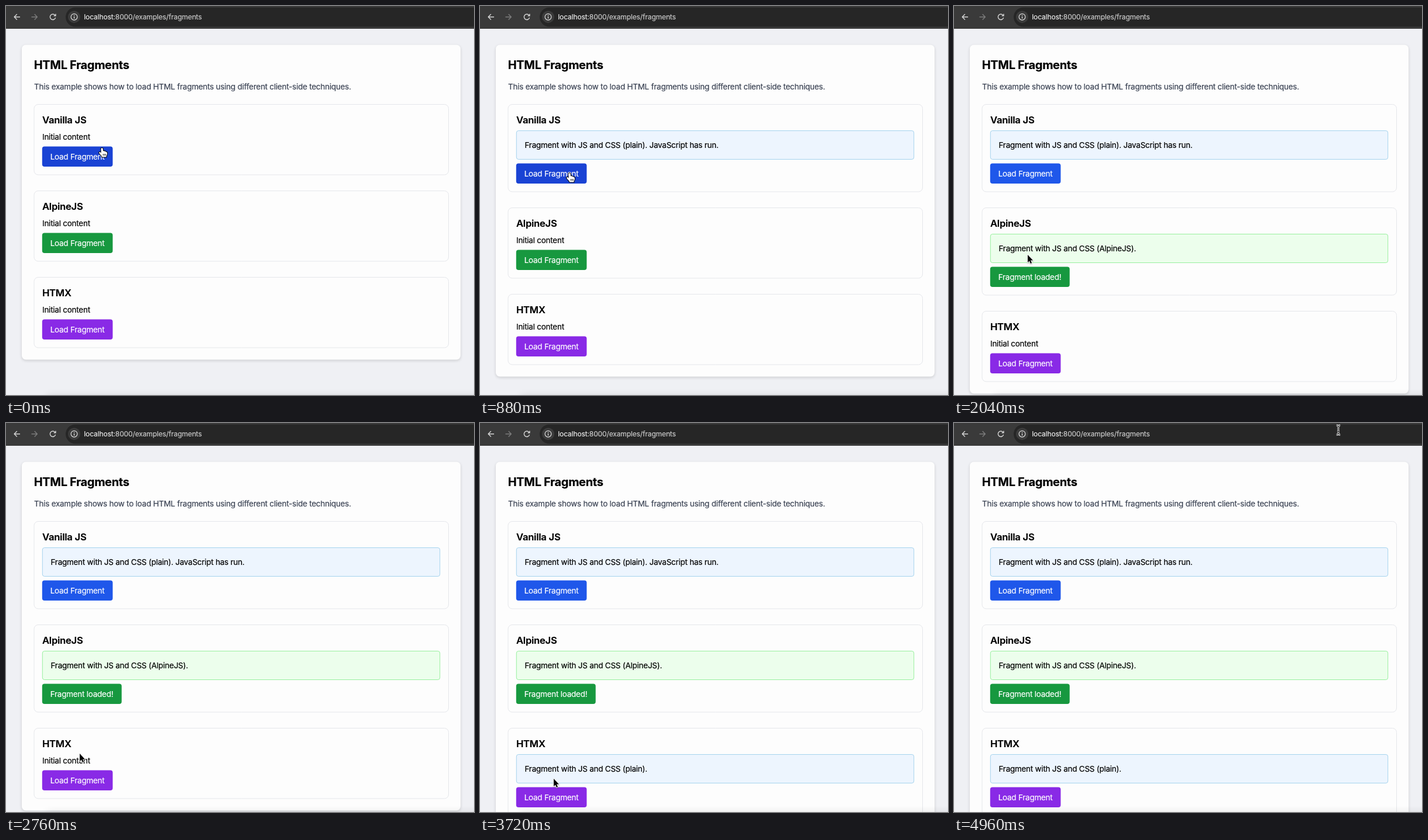
Animation of 800 by 666 pixels, one loop 5000 ms. Source, as an HTML page with a canvas:

```html
<!DOCTYPE html>
<html lang="en">
<head>
<meta charset="utf-8">
<title>HTML Fragments</title>
<style>
  html, body { margin: 0; width: 100%; height: 100%; overflow: hidden; background: #eff0f4; }
  canvas { display: block; }
</style>
</head>
<body>
<canvas id="stage" width="800" height="666"></canvas>
<script>
const ctx = document.getElementById('stage').getContext('2d');
const LOOP = 5000;
const GROWTH = 29;

const BLUE_BOX = { fill: '#edf5fe', line: '#a5d3ee' };
const GREEN_BOX = { fill: '#ecfeec', line: '#98f09e' };

const CARDS = [
  { title: 'Vanilla JS', loadedAt: 280, color: '#1f57ea', hover: '#1a43d4', box: BLUE_BOX,
    fragment: 'Fragment with JS and CSS (plain). JavaScript has run.', textEnd: 408 },
  { title: 'AlpineJS', loadedAt: 1880, color: '#17983f', hover: '#147534', box: GREEN_BOX,
    fragment: 'Fragment with JS and CSS (AlpineJS).', textEnd: 311, doneLabel: 'Fragment loaded!' },
  { title: 'HTMX', loadedAt: 3560, color: '#892ae6', hover: '#7620cc', box: BLUE_BOX,
    fragment: 'Fragment with JS and CSS (plain).', textEnd: 286 }
];

// Pointer stops: [ms, x, y], eased in between.
const STOPS = [
  [0, 164, 243], [420, 164, 243], [820, 153, 286], [1140, 153, 286],
  [1640, 127, 427], [1920, 126, 426], [2260, 126, 426], [2740, 126, 566],
  [2840, 126, 567], [3240, 126, 609], [4120, 126, 609], [4480, 148, 560],
  [4920, 657, 12], [5000, 657, 12]
];

const HAND = new Path2D('M-1.6 1.2Q0-1 1.6 1.2L2 5.4Q3.8 4.4 4.6 6Q6.3 5.3 7 7Q9 6.6 9 9Q9 12 7.7 13.2L7.4 15.5H0L-.6 13.5Q-4.4 10-5 8Q-4.4 6-1.4 8.4Z');
const HAND_LINES = new Path2D('M2.2 10.2V13.2M4.3 10.2V13.2M6.3 10.2V13.2');
const ARROW = new Path2D('M0 0V13L2.9 10.4L4.9 14.9L7 14L5 9.6H9Z');
const IBEAM = new Path2D('M-3.2-8Q0-8 0-5.5Q0-8 3.2-8M0-5.5V5.5M-3.2 8Q0 8 0 5.5Q0 8 3.2 8M-1.8 2.5H1.8');

const smooth = k => k * k * (3 - 2 * k);

function pointerAt(t) {
  const i = STOPS.findIndex(stop => stop[0] > t);
  const [t0, x0, y0] = STOPS[i - 1];
  const [t1, x1, y1] = STOPS[i];
  const k = smooth((t - t0) / (t1 - t0));
  return { x: x0 + (x1 - x0) * k, y: y0 + (y1 - y0) * k };
}

function roundBox(x, y, w, h, r, fill, line) {
  ctx.beginPath();
  ctx.roundRect(x, y, w, h, r);
  if (fill) { ctx.fillStyle = fill; ctx.fill(); }
  if (line) { ctx.strokeStyle = line; ctx.lineWidth = 1; ctx.stroke(); }
}

// The hairline stroke gives the slightly heavier look of smoothed glyphs.
function text(str, x, y, color = '#000', size = 13.4, weight = 400, spacing = -0.2) {
  ctx.font = `${weight} ${size}px Inter, sans-serif`;
  ctx.letterSpacing = spacing + 'px';
  ctx.fillStyle = ctx.strokeStyle = color;
  ctx.lineWidth = 0.2;
  ctx.lineJoin = 'round';
  ctx.fillText(str, x, y);
  ctx.strokeText(str, x, y);
  return ctx.measureText(str).width;
}

function strokePath(path, color, width) {
  ctx.strokeStyle = color;
  ctx.lineWidth = width;
  ctx.stroke(path);
}

function drawToolbar() {
  ctx.fillStyle = '#3a3a3a';
  ctx.fillRect(0, 0, 800, 39);
  roundBox(102, 2.5, 760, 33, 16.5, '#262626');

  const back = new Path2D('M24 18.7H14.3M18.8 14L14.1 18.7L18.8 23.4');
  strokePath(back, '#d6d6d6', 1.4);
  ctx.save();
  ctx.translate(67.5, 0);
  ctx.scale(-1, 1);
  strokePath(back, '#7c7c7c', 1.4);
  ctx.restore();

  strokePath(new Path2D('M84 16.2A4.7 4.7 0 1 0 84.6 19.8M84.9 13.6V16.9H81.6'), '#d6d6d6', 1.4);

  ctx.beginPath();
  ctx.arc(116.5, 18.7, 10.5, 0, Math.PI * 2);
  ctx.fillStyle = '#3c3c3c';
  ctx.fill();
  ctx.beginPath();
  ctx.arc(116.5, 18.7, 5.4, 0, Math.PI * 2);
  ctx.strokeStyle = '#dcdcdc';
  ctx.lineWidth = 1.2;
  ctx.stroke();
  ctx.fillStyle = '#dcdcdc';
  ctx.fillRect(115.9, 15.6, 1.3, 1.4);
  ctx.fillRect(115.9, 18, 1.3, 3.6);

  const hostWidth = text('localhost', 133.3, 23, '#ececec', 12, 400, -0.12);
  text(':8000/examples/fragments', 133.3 + hostWidth, 23, '#c9c9c9', 12, 400, -0.12);
}

function layout(t) {
  let y = 168.5;
  return CARDS.map(card => {
    const loaded = t >= card.loadedAt;
    const grow = loaded ? GROWTH : 0;
    const place = {
      card, loaded, y, height: 120.5 + grow,
      button: { x: 61.8, y: y + 72.1 + grow, w: loaded && card.doneLabel ? 135.9 : 120.6, h: 34.3 },
      copy: loaded
        ? { x: 76, y: y + 60, w: card.textEnd - 76, h: 20 }
        : { x: 62, y: y + 46, w: 83, h: 20 }
    };
    y += 148 + grow;
    return place;
  });
}

const inside = (p, r) => p.x >= r.x && p.x < r.x + r.w && p.y >= r.y && p.y < r.y + r.h;

function drawCard({ card, loaded, y, height, button, copy }, pointer) {
  roundBox(48, y, 708.5, height, 7, null, '#e5e7eb');
  text(card.title, 62, y + 32.7, '#000', 16.6, 600, -0.25);
  if (loaded) {
    roundBox(62.3, y + 45, 679.4, 49, 3.5, card.box.fill, card.box.line);
    text(card.fragment, copy.x + 0.5, y + 74.7);
  } else {
    text('Initial content', copy.x, y + 60.5);
  }
  roundBox(button.x, button.y, button.w, button.h, 4, inside(pointer, button) ? card.hover : card.color);
  text(loaded && card.doneLabel || 'Load Fragment', 75.7, button.y + 22.3, '#fff');
}

function drawPage(places, pointer) {
  const last = places[2];
  ctx.fillStyle = '#eff0f4';
  ctx.fillRect(0, 39, 800, 627);

  ctx.save();
  ctx.shadowColor = 'rgba(0,0,0,.15)';
  ctx.shadowBlur = 5;
  ctx.shadowOffsetY = 1.8;
  roundBox(27, 66.5, 750, last.y + last.height + 20.5 - 66.5, 7, '#fdfdfd');
  ctx.restore();

  text('HTML Fragments', 47.7, 108, '#000', 20, 700, -0.33);
  text('This example shows how to load HTML fragments using different client-side techniques.', 48, 143, '#3a4253');
  places.forEach(place => drawCard(place, pointer));

  ctx.save();
  ctx.shadowColor = 'rgba(0,0,0,.12)';
  ctx.shadowBlur = 14;
  ctx.fillStyle = '#000';
  ctx.fillRect(70, 667, 800, 30);
  ctx.restore();
}

function drawPointer(p, places) {
  const onButton = places.some(place => inside(p, place.button));
  const onText = p.y < 36 || places.some(place => inside(p, place.copy));
  ctx.save();
  ctx.translate(p.x, p.y);
  ctx.lineJoin = 'round';
  if (onButton) {
    strokePath(HAND, '#000', 2);
    ctx.fillStyle = '#fff';
    ctx.fill(HAND);
    strokePath(HAND_LINES, '#000', 0.9);
  } else if (onText) {
    strokePath(IBEAM, '#fff', 2.8);
    strokePath(IBEAM, '#111', 1);
  } else {
    ctx.shadowColor = 'rgba(0,0,0,.3)';
    ctx.shadowBlur = 2;
    ctx.shadowOffsetY = 1;
    strokePath(ARROW, '#fff', 1.8);
    ctx.shadowColor = 'transparent';
    ctx.fillStyle = '#000';
    ctx.fill(ARROW);
  }
  ctx.restore();
}

function render(t) {
  const pointer = pointerAt(t);
  const places = layout(t);
  drawPage(places, pointer);
  drawToolbar();
  drawPointer(pointer, places);
}

const start = performance.now();
function tick() {
  render((performance.now() - start) % LOOP);
  requestAnimationFrame(tick);
}
tick();
</script>
</body>
</html>
```
